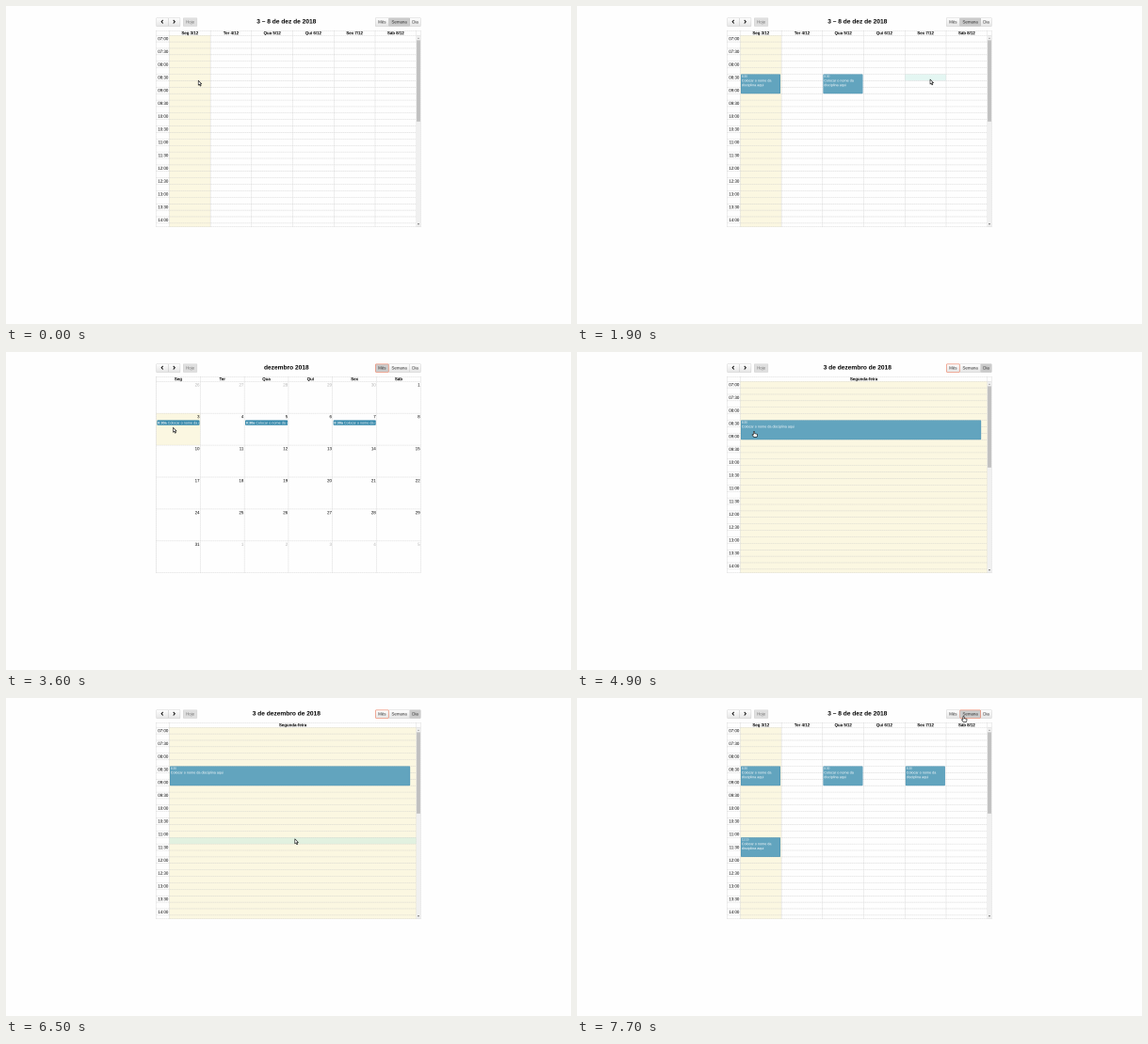
Write an HTML page with a canvas that moves like this. It is 600x338 px and loops after 8 s.

```html
<!DOCTYPE html>
<html lang="pt">
<head>
<meta charset="utf-8">
<style>
  html, body { margin: 0; width: 100%; height: 100%; overflow: hidden; background: #fefefe; }
  canvas { display: block; width: 600px; height: 338px; }
</style>
</head>
<body>
<canvas id="stage" width="600" height="338"></canvas>
<script>
const W = 600, H = 338, ZOOM = 4;
const LOOP = 8000, STEP = 100;
const LEFT = 159.5, RIGHT = 440.4, HEAD = 26.2, TOP = 31.2, BOTTOM = 234.8;
const GRID = 173.4, GRID_END = 435.7, SLOT = 6.885;
const DAYS = ['Seg', 'Ter', 'Qua', 'Qui', 'Sex', 'Sáb'];
const TODAY = '#fbf7e1', LABEL = 'Colocar o nome da';

// Cursor stops: time, x, y
const PATH = [
  [0, 204.2, 79.2], [300, 204.2, 79.2], [1000, 287.3, 77.5], [1300, 287.3, 77.5],
  [1900, 375, 78], [2000, 375, 78], [2700, 402, 15.5], [3100, 402, 15.5],
  [3600, 177.5, 80.3], [3900, 188, 84.5], [5300, 188, 84.5], [5900, 298, 82],
  [6100, 298, 82], [6500, 306.8, 149.8], [6700, 306.8, 149.8], [7600, 410.5, 19.5], [LOOP, 410.5, 19.5]
];

// Lessons: day column, first slot, time selected, time created
const LESSONS = [
  { day: 0, slot: 6, time: '8:30', picked: 200, made: 400 },
  { day: 2, slot: 6, time: '8:30', picked: 1200, made: 1300 },
  { day: 4, slot: 6, time: '8:30', picked: 1900, made: 2000 },
  { day: 0, slot: 17, time: '11:15', picked: 6500, made: 6600 }
];

// The page is drawn large and then reduced, as a scaled-down screen would be
const page = Object.assign(document.createElement('canvas'), { width: W * ZOOM, height: H * ZOOM });
const g = page.getContext('2d');
g.scale(ZOOM, ZOOM);
const stage = document.getElementById('stage').getContext('2d');
stage.imageSmoothingQuality = 'high';

const face = g.createLinearGradient(0, 12.6, 0, 21.7);
face.addColorStop(0, '#fff');
face.addColorStop(1, '#e6e6e6');

const range = n => [...Array(n).keys()];

function rect(x, y, w, h, fill) {
  g.fillStyle = fill;
  g.fillRect(x, y, w, h);
}

function box(x, y, w, h, fill, edge, line = .32) {
  g.beginPath();
  g.roundRect(x + line / 2, y + line / 2, w - line, h - line, .8);
  g.fillStyle = fill;
  g.fill();
  g.strokeStyle = edge;
  g.lineWidth = line;
  g.stroke();
}

function text(x, y, s, { size = 4.4, bold = false, align = 'left', color = '#000' } = {}) {
  g.font = `${bold ? 'bold ' : ''}${size}px "Liberation Sans", Arial, sans-serif`;
  g.textAlign = align;
  g.fillStyle = color;
  g.fillText(s, x, y);
  return g.measureText(s).width;
}

function line(x1, y1, x2, y2) {
  g.beginPath();
  g.moveTo(x1, y1);
  g.lineTo(x2, y2);
  g.setLineDash([1.4, .6]);
  g.strokeStyle = '#c8c8c8';
  g.lineWidth = .4;
  g.stroke();
  g.setLineDash([]);
}
const hLine = (y, x1 = LEFT, x2 = RIGHT) => line(x1, y, x2, y);
const vLine = x => line(x, HEAD, x, BOTTOM);

function cursorAt(t) {
  const i = PATH.findIndex(p => p[0] > t);
  const [t0, x0, y0] = PATH[i - 1], [t1, x1, y1] = PATH[i];
  const u = (t - t0) / (t1 - t0), k = u * u * (3 - 2 * u);
  return [x0 + (x1 - x0) * k, y0 + (y1 - y0) * k];
}

function button(x, w, label, { active, focus } = {}) {
  box(x, 12.5, w, 9.3, active ? '#cbcbcb' : face, focus ? '#ec8a70' : '#bdbdbd', focus ? .7 : .32);
  text(x + w / 2, 18.6, label, { align: 'center', color: '#333' });
}

function chevron(x, dir) {
  g.strokeStyle = '#111';
  g.lineWidth = 1;
  g.stroke(new Path2D(`M${x + dir} 14.9L${x - dir} 16.7L${x + dir} 18.5`));
}

function toolbar(view, t) {
  const title = { week: '3 – 8 de dez de 2018', month: 'dezembro 2018', day: '3 de dezembro de 2018' }[view];
  button(159.5, 12.9, '');
  button(172.2, 12.9, '');
  chevron(165.9, .8);
  chevron(178.5, -.8);
  g.globalAlpha = .6;
  button(188, 15.1, 'Hoje', { active: true });
  g.globalAlpha = 1;
  text(297.8, 18.4, title, { size: 6.6, bold: true, align: 'center' });
  button(428.6, 11.9, 'Dia', { active: view === 'day' });
  button(406.3, 22.6, 'Semana', { active: view === 'week', focus: t >= 7500 });
  button(392.1, 14.5, 'Mês', {
    active: view === 'month' || t >= 2700 && t < 2900,
    focus: t >= 2700 && t < 7500
  });
}

function frame() {
  [HEAD, TOP, BOTTOM].forEach(y => hLine(y));
  [LEFT, RIGHT].forEach(vLine);
}

function scrollbar() {
  rect(435.8, TOP, 4.4, BOTTOM - TOP, '#f0f0f0');
  rect(436.1, 36.4, 3.8, 86.4, '#c0c0c0');
  g.fillStyle = '#a0a0a0';
  g.fill(new Path2D('M436.9 34.9h2.2l-1.1-1.4z'));
  g.fillStyle = '#505050';
  g.fill(new Path2D('M436.9 231.3h2.2l-1.1 1.4z'));
}

// Box of a lesson in the week or day grid
function lessonBox(lesson, colWidth, view) {
  const x = GRID + (view === 'day' ? 0 : lesson.day * colWidth);
  return { x: x + .6, y: TOP + lesson.slot * SLOT, w: colWidth * .975 - .6, h: 3 * SLOT };
}

function timeGrid(view, t, lessons) {
  const names = view === 'day' ? ['Segunda-feira'] : DAYS.map((d, i) => `${d} ${i + 3}/12`);
  const col = (GRID_END - GRID) / names.length;
  rect(GRID, TOP, col, BOTTOM - TOP, TODAY);
  for (const l of LESSONS)
    if (t >= l.picked && t < l.made)
      rect(GRID + (view === 'day' ? 0 : l.day * col), TOP + l.slot * SLOT, col, SLOT, 'rgba(185,230,222,.38)');
  for (const i of range(30)) {
    const y = TOP + i * SLOT;
    if (i) hLine(y, LEFT, GRID_END);
    if (i % 2 === 0) {
      const minutes = 420 + i * 15;
      const clock = `${Math.floor(minutes / 60)}`.padStart(2, '0') + (minutes % 60 ? ':30' : ':00');
      text(172.3, y + 5, clock, { align: 'right' });
    }
  }
  names.forEach((name, i) => {
    vLine(GRID + i * col);
    text(GRID + (i + .5) * col, 30.3, name, { bold: true, align: 'center' });
  });
  for (const l of lessons) {
    const { x, y, w, h } = lessonBox(l, col, view);
    const rows = view === 'day' ? [LABEL + ' disciplina aqui'] : [LABEL, 'disciplina aqui'];
    box(x, y, w, h, '#62a4be', '#3a87ad');
    text(x + .9, y + 3.2, l.time, { size: 3.1, color: '#fff' });
    rows.forEach((s, i) => text(x + .9, y + 7.9 + i * 4.8, s, { size: 3.74, color: '#fff' }));
  }
  vLine(GRID_END);
  scrollbar();
  frame();
}

function monthGrid(lessons) {
  const col = (RIGHT - LEFT) / 6, row = (BOTTOM - TOP) / 6;
  rect(LEFT, TOP + row, col, row, TODAY);
  DAYS.forEach((name, c) => {
    const x = LEFT + c * col;
    vLine(x);
    text(x + col / 2, 30.3, name, { bold: true, align: 'center' });
    for (const r of range(6)) {
      const date = new Date(2018, 10, 26 + r * 7 + c);
      const color = date.getMonth() === 11 ? '#000' : '#b3b3b3';
      text(x + col - .8, TOP + r * row + 5.2, date.getDate(), { align: 'right', color });
    }
  });
  for (const r of range(5)) hLine(TOP + (r + 1) * row);
  for (const l of lessons) {
    const x = LEFT + l.day * col + .9, y = TOP + row + 7.3, w = col - 1.7;
    const style = { size: 3.74, color: '#fff' };
    box(x, y, w, 5.4, '#3588ab', '#3588ab');
    g.save();
    g.beginPath();
    g.rect(x, y, w - .6, 5.4);
    g.clip();
    const used = text(x + .7, y + 4, `${l.time}a `, { ...style, bold: true });
    text(x + .7 + used, y + 4, `${LABEL} disciplina`, style);
    g.restore();
  }
  frame();
}

function cursor(x, y, hand) {
  const shape = new Path2D(hand
    ? 'M-.6 .3Q0-.4 .6 .3V2.2L3 2.7Q3.7 2.9 3.6 3.7L3 5.8H-.3L-2 3.6Q-1.9 2.8-.6 3.5Z'
    : 'M0 0V5L1.2 4L2 5.9L2.9 5.5L2.1 3.7H3.6Z');
  g.save();
  g.translate(x, y);
  g.fillStyle = '#fff';
  g.fill(shape);
  g.strokeStyle = '#111';
  g.lineWidth = .6;
  g.lineJoin = 'round';
  g.stroke(shape);
  g.restore();
}

function draw(t) {
  const view = t < 2900 || t >= 7600 ? 'week' : t < 4900 ? 'month' : 'day';
  const lessons = LESSONS.filter(l => t >= l.made && (view !== 'day' || l.day === 0));
  const [x, y] = cursorAt(t);
  const col = (GRID_END - GRID) / (view === 'day' ? 1 : 6);
  const overLesson = view !== 'month' && lessons.some(l => {
    const b = lessonBox(l, col, view);
    return x > b.x && x < b.x + b.w && y > b.y && y < b.y + b.h;
  });
  rect(0, 0, W, H, '#fefefe');
  toolbar(view, t);
  if (view === 'month') monthGrid(lessons);
  else timeGrid(view, t, lessons);
  cursor(x, y, overLesson || y < 22 && x > 392);
  stage.drawImage(page, 0, 0, W, H);
}

const start = performance.now();
let shown = -1;
function tick() {
  const t = Math.floor((performance.now() - start) % LOOP / STEP) * STEP;
  if (t !== shown) draw(shown = t);
  requestAnimationFrame(tick);
}
tick();
</script>
</body>
</html>
```
